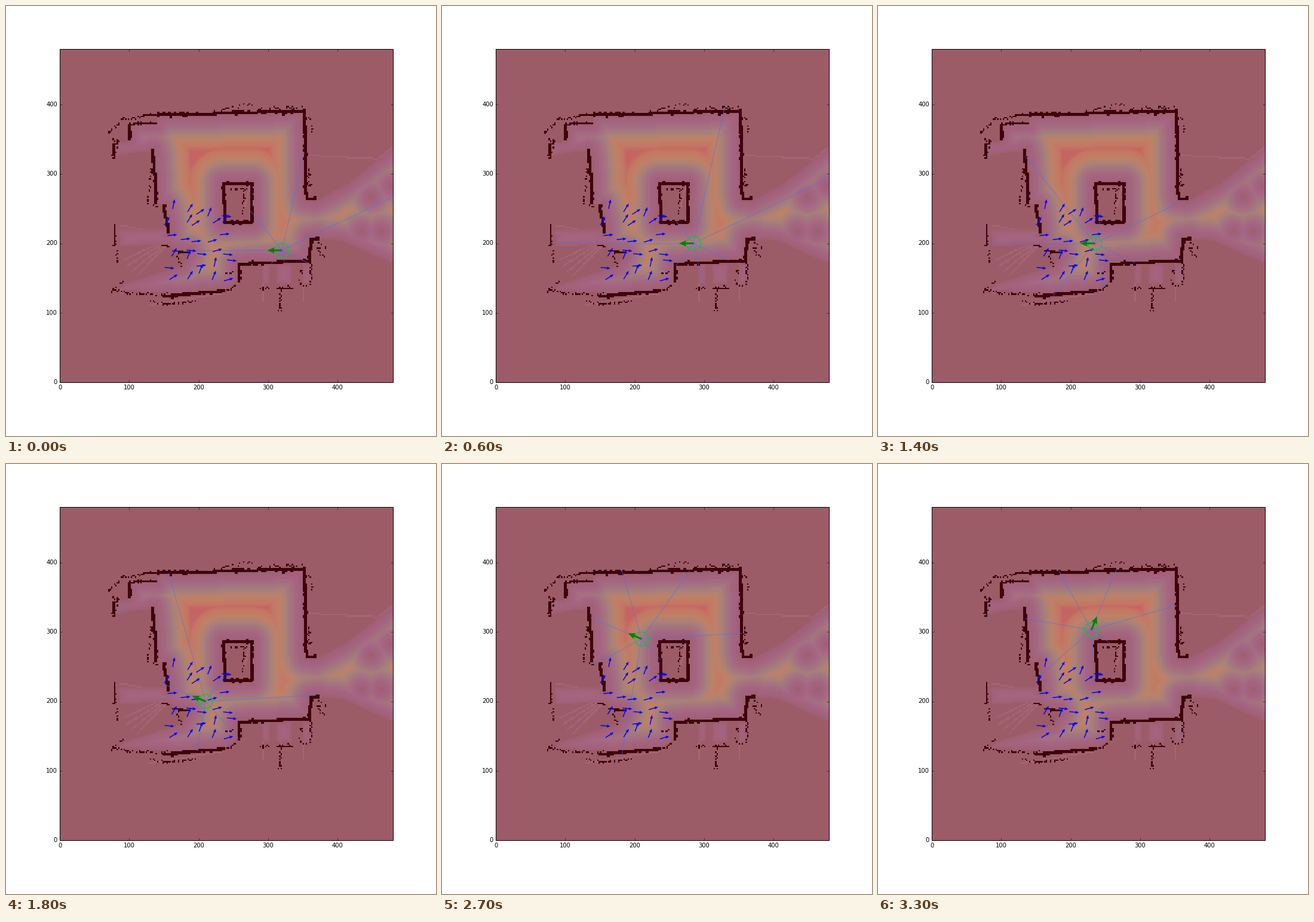
A matplotlib script for the animation above (3400 ms loop, 720 px wide and 720 px high).

```python
import numpy as np
import matplotlib.pyplot as plt
from matplotlib.animation import FuncAnimation
from matplotlib.colors import LinearSegmentedColormap
from matplotlib.patches import Circle
from matplotlib.path import Path

SCALE = 558 / 480      # pixels per map unit
CELL = 2 * SCALE       # pixels per grid cell
N = 240
FRAMES = 34
RAYS = 7
STEP = 8               # ray sampling distance; thin walls can be missed
rng = np.random.default_rng(4)


def to_map(points):
    """Stage pixels (y down) to map units."""
    p = np.asarray(points, float)
    return np.stack([p[..., 0] - 90, 630 - p[..., 1]], -1) / SCALE


def stroke(grid, points, size=1, density=1.0, spread=0.0):
    """Paint a polyline of square blobs into a cell grid."""
    cells = to_map(points) / 2
    for a, b in zip(cells[:-1], cells[1:]):
        count = int(2 * np.hypot(*(b - a))) + 2
        for t in np.linspace(0, 1, count):
            if rng.random() < density:
                p = a + (b - a) * t + rng.normal(0, 1, 2) * spread
                i, j = np.floor(p - (size - 1) / 2).astype(int)
                grid[max(j, 0):j + size, max(i, 0):i + size] = True


def inside(points):
    c = np.arange(N) * 2 + 1
    xy = np.stack(np.meshgrid(c, c), -1).reshape(-1, 2)
    return Path(to_map(points)).contains_points(xy).reshape(N, N)


def distance(blocked):
    """Euclidean distance to the nearest blocked cell, in pixels."""
    k = np.arange(N)
    sq = ((k[:, None] - k[None, :]) ** 2).astype(np.float32)
    col = np.where(blocked.T, 0, 1e6).astype(np.float32)
    col = np.stack([(c[None, :] + sq).min(1) for c in col])
    rows = np.stack([(r[None, :] + sq).min(1) for r in col.T])
    return np.sqrt(rows) * CELL


# Key points of the floor plan, in stage pixels
WALLS = [
    [(254, 181), (330, 181), (400, 178), (500, 177), (501, 262), (503, 323),
     (517, 323)],
    [(522, 389), (511, 391), (508, 427), (391, 432), (390, 461)],
    [(265, 486), (325, 480), (365, 477)],
    [(246, 242), (250, 290), (251, 331)],
    [(264, 335), (267, 350), (272, 378)],
    [(364, 298), (412, 298), (412, 362), (367, 362), (364, 298)],
    [(207, 223), (207, 202)],
    [(180, 233), (180, 248)],
]
THIN = [
    [(232, 183), (256, 181)],
    [(206, 199), (220, 196), (252, 196)],
    [(280, 410), (306, 413)],
    [(262, 400), (273, 403)],
    [(182, 367), (182, 402)],
    [(455, 472), (480, 472)],
]
SCATTER = [
    [(170, 212), (195, 189), (232, 184)],
    [(178, 222), (187, 226), (180, 256)],
    [(345, 178), (370, 171), (412, 165)],
    [(420, 173), (498, 169)],
    [(508, 182), (513, 215)],
    [(507, 263), (511, 318)],
    [(243, 270), (237, 332), (258, 338)],
    [(185, 403), (188, 430)],
    [(285, 419), (293, 436)],
    [(176, 478), (197, 459)],
    [(178, 475), (205, 481), (300, 485)],
    [(240, 495), (266, 500), (320, 494)],
    [(365, 478), (386, 467)],
    [(366, 447), (379, 445)],
    [(428, 473), (442, 473)],
    [(460, 475), (460, 516)],
    [(495, 440), (494, 466), (510, 468), (511, 432)],
    [(517, 391), (537, 404), (520, 406), (534, 421)],
    [(374, 306), (408, 306)],
    [(399, 308), (397, 347)],
]
FREE = [
    (182, 252), (184, 229), (205, 227), (211, 199), (250, 197), (256, 184),
    (498, 179), (501, 320), (517, 327), (565, 302), (600, 276), (649, 236),
    (649, 432), (560, 392), (509, 390), (506, 427), (390, 430), (388, 460),
    (370, 474), (295, 481), (186, 476), (195, 467), (255, 447), (292, 436),
    (306, 415), (262, 400), (190, 402), (188, 375), (264, 375), (266, 335),
    (250, 331), (246, 242), (212, 246),
]
BOX = [(361, 296), (414, 296), (414, 364), (361, 364)]
PILLARS = [(613, 320), (645, 300), (595, 378), (628, 378)]

walls = np.zeros((N, N), bool)
dots, streaks, pillars = walls.copy(), walls.copy(), walls.copy()
for line in WALLS:
    stroke(walls, line, size=2)
    stroke(dots, line, size=2, density=0.3, spread=0.5)
for line in THIN:
    stroke(walls, line)
    stroke(dots, line, density=0.4, spread=0.5)
for line in SCATTER:
    stroke(dots, line, density=0.35, spread=0.5)
for p in PILLARS:
    stroke(pillars, [p, p])

free = inside(FREE) & ~inside(BOX)
# Alcoves seen through the lower wall, each with a trailing streak
for x, w in [(435, 6), (466, 13), (503, 7)]:
    free |= inside([(x - w, 432), (x + w, 432), (x + w, 466), (x - w, 466)])
    stroke(streaks, [(x - 5, 432), (x - 4, 500 - w)])
# Glimpses fanning out to the lower left
for a in np.radians([-10, 0, 25, 32, 39, 46]):
    stroke(streaks, [(285, 384), (285 - 96 * np.cos(a), 384 + 96 * np.sin(a))])
stroke(streaks, [(240, 501), (362, 481)])
stroke(streaks, [(505, 250), (622, 256), (648, 236)])
stroke(streaks, [(408, 304), (400, 335)])

heat = LinearSegmentedColormap.from_list("heat", [
    (0, "#9f5f70"), (0.22, "#a56583"), (0.4, "#a4757f"), (0.52, "#a8817a"),
    (0.68, "#be8268"), (0.87, "#c47864"), (1, "#c66363")])
img = np.full((N, N, 3), (155, 92, 104), np.uint8)
img[streaks] = (163, 102, 114)
shade = heat(distance(~free | walls | pillars) / 61, bytes=True)
img[free] = shade[free][:, :3]
img[walls | dots] = (62, 0, 10)
blocked = walls | ~(free | streaks)


def pose(f):
    """Drive left, climb between the walls, then turn towards the top."""
    t, px, py = np.transpose([
        (0, 320, 190), (3, 290, 200), (9, 280, 200), (14, 235, 200),
        (17, 210, 200), (18, 210, 200), (28, 210, 300), (33, 230, 303)])
    turn = np.interp(f, [17, 18, 28, 32], [8, 7, 7, 3])
    return np.interp(f, t, px), np.interp(f, t, py), np.round(turn) * 22.5


def cast(x, y, a):
    """Distance to the first sample that is not open floor."""
    r = np.arange(STEP, 600, STEP)
    i = np.floor((x + r * np.cos(a)) / 2).astype(int)
    j = np.floor((y + r * np.sin(a)) / 2).astype(int)
    out = (i < 0) | (j < 0) | (i >= N) | (j >= N)
    hit = out | blocked[np.clip(j, 0, N - 1), np.clip(i, 0, N - 1)]
    return r[hit.argmax()]


plt.rcParams.update({"font.family": "DejaVu Sans", "font.size": 10})
fig = plt.figure(figsize=(10, 10), dpi=72, facecolor="white")
ax = fig.add_axes([0.125, 0.125, 0.775, 0.775])
ax.imshow(img, origin="lower", extent=(0, 480, 0, 480),
          interpolation="nearest")
ax.set(xlim=(0, 480), ylim=(0, 480),
       xticks=range(0, 401, 100), yticks=range(0, 401, 100))
ax.tick_params(direction="in", length=4, width=0.5, pad=4,
               top=True, right=True)
for label in ax.get_yticklabels():
    label.set_va("center")
for spine in ax.spines.values():
    spine.set_linewidth(1)


def vector(deg, length):
    a = np.radians(deg)
    return length * np.cos(a), length * np.sin(a)


def arrows(xy, deg, length, width, color, z):
    return ax.quiver(*np.transpose(xy), *vector(deg, length), color=color,
                     units="dots", width=width, scale_units="xy", scale=1,
                     headwidth=3.4, headlength=4, headaxislength=3.6,
                     zorder=z)


# Particle cloud: a jittered grid with a few preferred headings
cloud = np.stack(np.meshgrid(np.linspace(274, 364, 5),
                             np.linspace(348, 453, 6)), -1).reshape(-1, 2)
cloud += rng.uniform(-9, 9, cloud.shape)
headings = rng.choice([-6, 6, 16, 33, 58, 68, 78], len(cloud))
arrows(to_map(cloud), headings, 14, 1.5, "blue", 4)

rays = [ax.plot([], [], color=(0.27, 0.46, 0.95), alpha=0.65, lw=1,
                zorder=3)[0] for _ in range(RAYS)]
ring = ax.add_patch(Circle((0, 0), 10, fill=False, lw=1.5,
                           ec=(0.08, 0.75, 0.29), zorder=5))
robot = arrows([(0, 0)], np.array([180.0]), 21, 3, "green", 6)


def update(f):
    x, y, deg = pose(f)
    for k, ray in enumerate(rays):
        a = np.radians(deg + k * 360 / RAYS)
        r = cast(x, y, a)
        ray.set_data([x, x + r * np.cos(a)], [y, y + r * np.sin(a)])
    ring.center = (x, y)
    robot.set_offsets([(x, y)])
    robot.set_UVC(*vector(np.array([deg]), 21))
    return [*rays, ring, robot]


anim = FuncAnimation(fig, update, frames=FRAMES, interval=100, repeat=True,
                     repeat_delay=0, blit=False)
plt.show()
```
